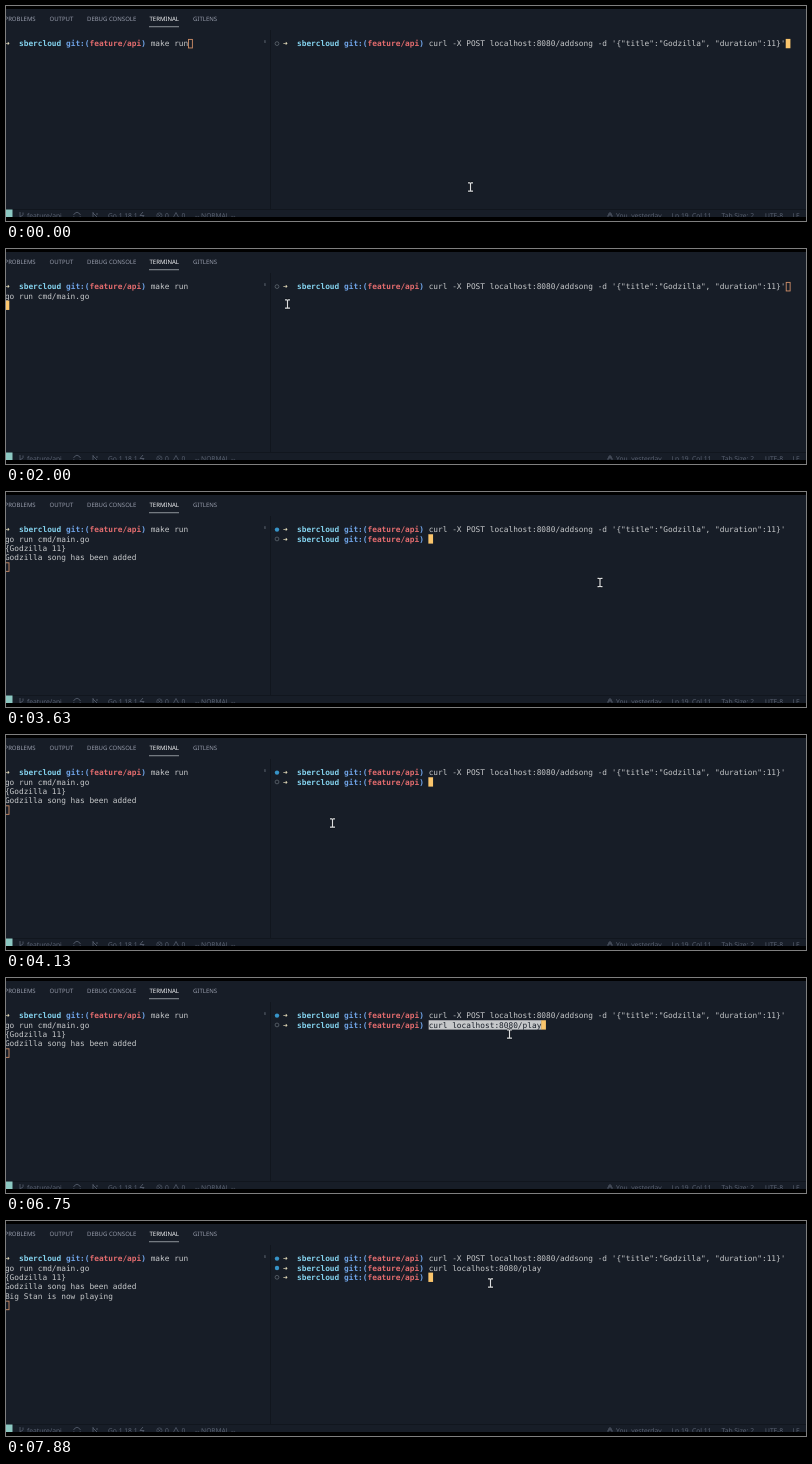
Animation of 800 by 215 pixels, one loop 8000 ms. Source, as an HTML page with a canvas:

```html
<!DOCTYPE html>
<html lang="en">
<head>
<meta charset="utf-8">
<title>Terminal session</title>
<style>
html, body { margin: 0; width: 100%; height: 100%; overflow: hidden; background: #000; }
canvas { display: block; }
</style>
</head>
<body>
<canvas id="stage" width="800" height="215"></canvas>
<script>
const ctx = document.getElementById('stage').getContext('2d');
const LOOP = 8000, STEP = 125;
const CELL = 4.702, ROW = 9.35, TOP = 32.9;
const LEFT = -1.1, RIGHT = 276.9;
const MONO = '7.81px "DejaVu Sans Mono", monospace';
const SANS = '"Noto Sans", "Open Sans", sans-serif';
const C = {
  bg: '#171d27', line: '#11161e', text: '#c6c8ca', cyan: '#84d2ee', blue: '#6fa3e6',
  red: '#e26c6e', cursor: '#fac56c', hollow: '#cf8f68', dim: '#979cab', status: '#5b6373', dot: '#3794c8'
};
const POST = `curl -X POST localhost:8080/addsong -d '{"title":"Godzilla", "duration":11}'`;
const PLAY = 'curl localhost:8080/play';
const PROMPT = 31;

// Event times in ms
const CLICK_LEFT = 1000, RUN = 1500, CLICK_RIGHT = 2625, ADD = 3625,
  PASTE = 5500, ENTER = 6875, PLAYING = 7000;

// Pointer path: time, x, y
const PATH = [
  [0, 464, 181], [250, 448, 170], [500, 345, 105], [750, 243, 55], [875, 233, 50],
  [1500, 233, 50], [1750, 240, 51], [2000, 281, 55], [2125, 440, 74], [2250, 605, 86],
  [2500, 627, 88], [3500, 627, 88], [3750, 560, 93], [4000, 345, 92], [4125, 326, 88],
  [4250, 420, 75], [4375, 501, 63], [4625, 503, 56], [7250, 503, 56], [7875, 484, 62]
];

function text(str, x, y, color, font) {
  ctx.font = font;
  ctx.fillStyle = color;
  ctx.fillText(str, x, y);
}

function rect(x, y, w, h, color) {
  ctx.fillStyle = color;
  ctx.fillRect(x, y, w, h);
}

function stroke(path, color, width = 0.8) {
  ctx.strokeStyle = color;
  ctx.lineWidth = width;
  ctx.stroke(new Path2D(path));
}

function put(pane, col, row, str, color = C.text, bold = false) {
  text(str, pane + col * CELL, TOP + row * ROW + 7.4, color, (bold ? 'bold ' : '') + MONO);
}

function prompt(pane, row, command = '') {
  put(pane, 0, row, '➜', '#e2d9b8', true);
  put(pane, 3, row, 'sbercloud', C.cyan, true);
  put(pane, 13, row, 'git:(', C.blue, true);
  put(pane, 18, row, 'feature/api', C.red, true);
  put(pane, 29, row, ')', C.blue, true);
  put(pane, PROMPT, row, command);
}

function cursor(pane, col, row, solid) {
  const x = pane + col * CELL - 0.3, y = TOP + row * ROW;
  if (solid) {
    rect(x, y, CELL, ROW, C.cursor);
  } else {
    ctx.strokeStyle = C.hollow;
    ctx.lineWidth = 0.9;
    ctx.strokeRect(x + 0.5, y + 0.5, CELL - 0.8, ROW - 0.8);
  }
}

function mark(row, done) {
  ctx.beginPath();
  ctx.arc(271, TOP + row * ROW + 4.7, done ? 2.2 : 1.9, 0, 7);
  if (done) {
    ctx.fillStyle = C.dot;
    ctx.fill();
  } else {
    ctx.strokeStyle = '#687079';
    ctx.lineWidth = 0.7;
    ctx.stroke();
  }
}

function tabs() {
  const labels = [['PROBLEMS', -1.5], ['OUTPUT', 43.5], ['DEBUG CONSOLE', 81], ['TERMINAL', 143.5], ['GITLENS', 187]];
  for (const [label, x] of labels)
    text(label, x, 15.3, label === 'TERMINAL' ? '#f4f5f7' : C.dim, '500 6px ' + SANS);
  rect(143, 20.3, 30, 0.9, '#9ba0a6');
}

function statusBar() {
  rect(0, 203, 800, 1, C.line);
  rect(0, 203.5, 6.5, 8, '#8cc8c2');
  const items = [['feature/api', 21], ['Go 1.18.1', 102], ['0', 159], ['0', 175.5], ['-- NORMAL --', 189],
    ['You, yesterday', 610], ['Ln 19, Col 11', 665.5], ['Tab Size: 2', 715.5], ['UTF-8', 759], ['LF', 786.5]];
  for (const [label, x] of items) text(label, x, 212, C.status, '6.7px ' + SANS);
  stroke('M14 206V212M17 206.5V208.5Q17 210 14 210.5', C.status);
  stroke('M67.5 209Q71 203.5 74.5 209M67.5 210.5Q71 214 74.5 210.5', C.status);
  stroke('M87 206V212M87 207L91 211M91 207V209', C.status);
  stroke('M137 206L134 209.5H138L135 213', C.status);
  stroke('M156 209.5A2.6 2.6 0 1 1 150.8 209.5A2.6 2.6 0 1 1 156 209.5M152.2 208.3L154.6 210.7M154.6 208.3L152.2 210.7', C.status, 0.6);
  stroke('M170 206.5L172.8 211.7H167.2Z', C.status, 0.7);
  stroke('M602 212V209H606V212M603 209V207H605V209', C.status);
  rect(0, 211, 800, 4, '#000');
}

function leftPane(t) {
  const lines = [];
  if (t >= RUN) lines.push('go run cmd/main.go');
  if (t >= ADD) lines.push('{Godzilla 11}', 'Godzilla song has been added');
  if (t >= PLAYING) lines.push('Big Stan is now playing');
  prompt(LEFT, 0, 'make run');
  lines.forEach((line, i) => put(LEFT, 0, i + 1, line));
  const focused = t >= CLICK_LEFT && t < CLICK_RIGHT;
  if (t < RUN) cursor(LEFT, PROMPT + 8, 0, focused);
  else cursor(LEFT, 0, lines.length + 1, focused);
  text('8', 257.8, 36.6, '#666e79', '4px ' + SANS);
}

function rightPane(t) {
  prompt(RIGHT, 0, POST);
  mark(0, t >= ADD);
  if (t < ADD) {
    cursor(RIGHT, PROMPT + POST.length, 0, t < CLICK_LEFT || t >= CLICK_RIGHT);
    return;
  }
  const pasted = t >= PASTE && t < ENTER;
  prompt(RIGHT, 1, t >= ENTER ? PLAY : '');
  mark(1, t >= PLAYING);
  if (pasted) {
    rect(RIGHT + PROMPT * CELL, TOP + ROW, PLAY.length * CELL, ROW, '#c6c8ca');
    put(RIGHT, PROMPT, 1, PLAY, C.bg);
  }
  if (t >= PLAYING) {
    prompt(RIGHT, 2);
    mark(2, false);
  }
  if (t >= ENTER && t < PLAYING) cursor(RIGHT, 0, 2, true);
  else cursor(RIGHT, PROMPT + (pasted ? PLAY.length : 0), t >= PLAYING ? 2 : 1, true);
}

function pointer(t) {
  const i = Math.max(1, PATH.findIndex(p => p[0] >= t));
  const [t0, x0, y0] = PATH[i - 1], [t1, x1, y1] = PATH[i];
  const k = (t - t0) / (t1 - t0);
  ctx.save();
  ctx.translate(x0 + (x1 - x0) * k + 0.5, y0 + (y1 - y0) * k);
  const beam = 'M-2.5 -4.2H-.8L0 -3.6L.8 -4.2H2.5M0 -3.6V3.6M-2.5 4.2H-.8L0 3.6L.8 4.2H2.5';
  stroke(beam, '#0b0e14', 2.4);
  stroke(beam, '#dcdee0', 1.2);
  ctx.restore();
}

function draw(now) {
  const t = Math.floor((now % LOOP + 5) / STEP) * STEP % LOOP;
  ctx.textRendering = 'geometricPrecision';
  rect(0, 0, 800, 215, C.bg);
  rect(0, 0, 800, 3, '#000');
  rect(264, 24, 1, 179, C.line);
  tabs();
  leftPane(t);
  rightPane(t);
  statusBar();
  pointer(t);
}

let start;
function tick(now) {
  start ??= now;
  draw(now - start);
  requestAnimationFrame(tick);
}
requestAnimationFrame(tick);
</script>
</body>
</html>
```
